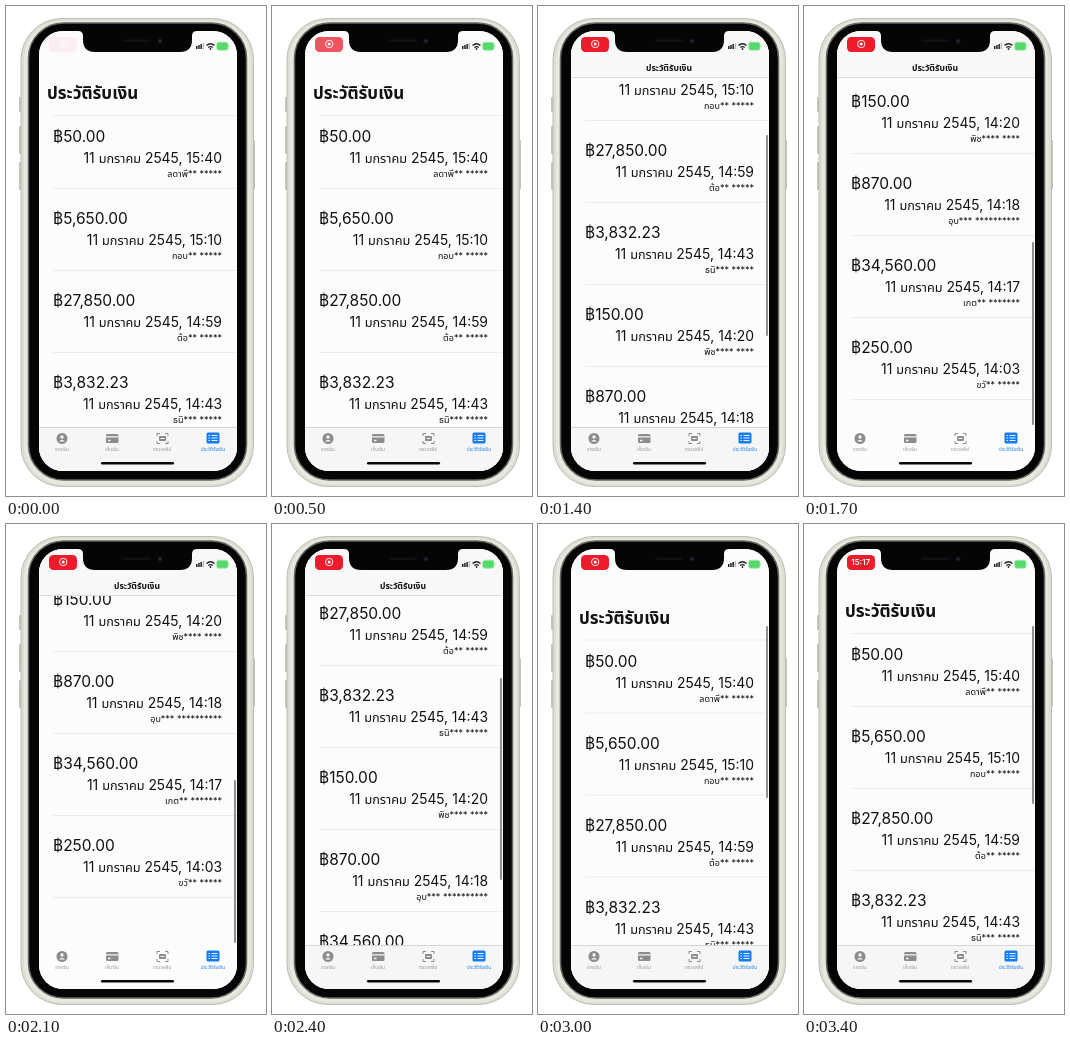
Animation, 260 px wide and 490 px high, one loop 3600 ms. Source, as an HTML page:

```html
<!DOCTYPE html>
<html lang="th">
<head>
<meta charset="utf-8">
<style>
html, body { margin: 0; width: 100%; height: 100%; overflow: hidden; background: #fff; }
#stage { position: relative; width: 260px; height: 490px; overflow: hidden;
  font-family: Inter, "Noto Sans Thai Looped", "Noto Sans Thai", "Noto Sans", sans-serif; color: #111; }
#stage div, #stage svg { position: absolute; }
svg { left: 0; top: 0; }
#screen { left: 33px; top: 25px; width: 197.5px; height: 439.5px; border-radius: 24px; background: #fcfcfd; overflow: hidden; }
#view { left: -33px; top: -25px; width: 260px; height: 490px; }
#list { left: 0; top: 0; width: 260px; height: 490px; }
.rule { left: 47px; width: 185px; height: 1px; background: #ededef; }
.row { left: 47px; width: 185px; height: 73px; border-bottom: 1px solid #ededef; }
.row div, .line { white-space: nowrap; }
.amount { left: 0; top: 12px; font-size: 15.5px; line-height: 20px; }
.date { right: 16px; top: 33px; font-size: 13.9px; line-height: 20px; }
.date span { font-size: 12.7px; }
.name { right: 16px; top: 51px; font-size: 9px; line-height: 16px; }
#bigClip { left: 33px; top: 72px; width: 199px; height: 349px; overflow: hidden; }
#big { left: 8px; top: 0; font-size: 17px; font-weight: 700; line-height: 30px; }
#nav { left: 33px; top: 25px; width: 199px; height: 47px; background: #fcfcfd; }
#navFill { inset: 0; background: #f8f8f9; border-bottom: 1px solid #dcdcde; }
#small { left: 33px; width: 196px; top: 53px; line-height: 18px; font-size: 8.6px; font-weight: 600; text-align: center; }
#tabs { left: 33px; top: 421px; width: 199px; height: 45px; background: #fcfcfd; }
#tabFill { inset: 0; background: #f6f6f7; border-top: 1px solid #d6d6d8; }
.tab { top: 439px; width: 50px; text-align: center; font-size: 4.8px; line-height: 9px; color: #999; }
.tab.on { color: #1b7df0; }
#bar { left: 228.2px; width: 1.8px; border-radius: 1px; background: #909092; }
#pill { left: 42.5px; top: 31px; width: 28.5px; height: 14.5px; border-radius: 4.5px; background: #ec1c2c; overflow: hidden; }
#clock { inset: 0; text-align: center; color: #fff; font-size: 8px; font-weight: 600; line-height: 14px; }
</style>
</head>
<body>
<div id="stage">
  <svg width="260" height="490">
    <g fill="#c3c5bc">
      <rect x="13" y="91" width="3" height="15" rx="1"/>
      <rect x="13" y="120" width="3" height="28" rx="1"/>
      <rect x="13" y="156" width="3" height="28" rx="1"/>
      <rect x="246.500" y="134" width="2.500" height="49" rx="1"/>
    </g>
    <rect x="15" y="12.500" width="232.500" height="468" rx="41" fill="#dcddd3" stroke="#bcbdb3"/>
    <rect x="18" y="14.500" width="226.500" height="464" rx="38.500" fill="#e7e8df"/>
    <rect x="22.500" y="17" width="218" height="457" rx="35" fill="#050505" stroke="#666760" stroke-width="1.500"/>
  </svg>
  <div id="screen"><div id="view">
    <div id="list"></div>
    <div id="nav"><div id="navFill"></div></div>
    <div id="bigClip"><div id="big" class="line">ประวัติรับเงิน</div></div>
    <div id="small" class="line">ประวัติรับเงิน</div>
    <div id="bar"></div>
    <div id="tabs"><div id="tabFill"></div></div>
    <div id="pill">
      <svg id="rec" width="29" height="14" fill="none" stroke="#fff">
        <circle cx="14.200" cy="7" r="3.700" stroke-width=".9"/><circle cx="14.200" cy="7" r="1.500" fill="#fff" stroke="none"/>
      </svg>
      <div id="clock">15:17</div>
    </div>
    <svg width="260" height="490">
      <path d="M72 25H191Q186 25 186 30V34Q186 46 174 46H89Q77 46 77 34V30Q77 25 72 25Z" fill="#050505"/>
      <g fill="#222">
        <rect x="190" y="40" width="1.500" height="3"/><rect x="192.200" y="39" width="1.500" height="4"/>
        <rect x="194.400" y="38" width="1.500" height="5"/><rect x="196.600" y="37" width="1.500" height="6" fill="#bbb"/>
      </g>
      <path d="M200.500 39.500Q204.500 36 208.500 39.500M202.300 41.500Q204.500 39.700 206.700 41.500"
        fill="none" stroke="#222" stroke-width="1.400"/>
      <circle cx="204.500" cy="43" r=".9" fill="#222"/>
      <rect x="210.700" y="36.200" width="11.300" height="8" rx="2" fill="#55d96a" stroke="#a5e9b0" stroke-width=".8"/>
      <rect x="222.500" y="39" width="1" height="2.600" fill="#a5e9b0"/>
      <g fill="#8c8c8c">
        <circle cx="56" cy="432.500" r="5.500"/>
        <rect x="100" y="428" width="12.500" height="9" rx="1.500"/>
        <rect x="153" y="430" width="7" height="5" rx="1"/>
      </g>
      <circle cx="56" cy="431" r="1.700" fill="#f5f5f5"/>
      <path d="M53 435.500Q56 432 59 435.500Z" fill="#f5f5f5"/>
      <path d="M100 430.800H112.500M102 434.500H104.500" stroke="#f5f5f5" stroke-width="1.300"/>
      <path d="M151 430V427.500H154M159 427.500H162V430M162 435V437.500H159M154 437.500H151V435" fill="none" stroke="#8c8c8c"/>
      <path d="M154.500 432.500H158.500" stroke="#f5f5f5"/>
      <rect x="200.500" y="426.500" width="13" height="11" rx="1.500" fill="#147cf4"/>
      <path d="M202.500 429.500H204M205.500 429.500H211.500M202.500 432H204M205.500 432H211.500M202.500 434.500H204M205.500 434.500H211.500" stroke="#fff" stroke-width=".9"/>
      <rect x="95" y="456" width="73" height="2.500" rx="1.250" fill="#080808"/>
    </svg>
    <div class="tab" style="left:31px">รายเงิน</div>
    <div class="tab" style="left:81px">เก็บเงิน</div>
    <div class="tab" style="left:131px">ตรวจสลิป</div>
    <div class="tab on" style="left:182px">ประวัติรับเงิน</div>
  </div></div>
  <svg width="260" height="490">
    <rect x="117" y="33.500" width="28" height="2.500" rx="1.250" fill="#111"/>
    <circle cx="154" cy="35" r="2.500" fill="#15171f"/><circle cx="154" cy="35" r="1" fill="#2b3044"/>
  </svg>
</div>
<script>
const $ = id => document.getElementById(id);
const LOOP = 3600, STEP = 100, TOP = 109, PITCH = 82, END = 344;
const rows = [
  ["50.00", "15:40", "ลดาพี** *****"],
  ["5,650.00", "15:10", "กอบ** *****"],
  ["27,850.00", "14:59", "ต้อ** *****"],
  ["3,832.23", "14:43", "ธนิ*** *****"],
  ["150.00", "14:20", "พิช**** ****"],
  ["870.00", "14:18", "อุบ*** **********"],
  ["34,560.00", "14:17", "เกต** *******"],
  ["250.00", "14:03", "ขวั** *****"]
];
$("list").innerHTML = `<div class="rule" style="top:${TOP}px"></div>` +
  rows.map(([sum, time, name], i) =>
    `<div class="row" style="top:${TOP + i * PITCH}px"><div class="amount">฿${sum}</div>` +
    `<div class="date">11 <span>มกราคม</span> 2545, ${time}</div><div class="name">${name}</div></div>`).join("");

// [ms, value]
const scroll = [[1100, 0], [1200, 14], [1300, 64], [1400, 150], [1500, 250], [1600, 325], [1700, 363],
  [1800, 382], [1900, 389], [2000, 388], [2100, 383], [2200, 356], [2300, 290], [2400, 205], [2500, 122],
  [2600, 57], [2700, 14], [2800, -10], [2900, -12], [3000, -6.5], [3100, -3], [3200, -1], [3300, 0]];
const fade = [[0, .06], [300, .45], [600, .9], [1000, 1]];
const clockIn = [[3000, 0], [3300, 1]];
const barIn = [[1100, 0], [1200, 1]];

const clamp = (v, lo = 0, hi = 1) => Math.min(hi, Math.max(lo, v));
function at(keys, t) {
  const i = keys.findIndex(k => k[0] > t);
  if (i < 0) return keys[keys.length - 1][1];
  if (!i) return keys[0][1];
  const [a, x] = keys[i - 1], [b, y] = keys[i];
  return x + (y - x) * (t - a) / (b - a);
}

// Scroll bar ends: the track grows as the title folds away, then the bar runs down it.
function barEnds(y) {
  const fold = clamp(y / 57), run = clamp((y - 57) / (END - 57));
  const over = Math.max(0, y - END);
  return [102 - 15 * fold + 130 * run + over, 280 + 8 * fold + 131 * run + Math.min(0, y)];
}

function draw(t) {
  const y = at(scroll, t), flat = clamp((y - 26) / 10);
  $("list").style.transform = $("big").style.transform = `translateY(${-y}px)`;
  $("big").style.opacity = 1 - flat;
  $("small").style.opacity = $("navFill").style.opacity = flat;
  $("tabFill").style.opacity = clamp((END - y) / 12);

  const [top, low] = barEnds(y);
  $("bar").style.top = top + "px";
  $("bar").style.height = low - top + "px";
  $("bar").style.opacity = at(barIn, t);

  const c = at(clockIn, t);
  $("pill").style.opacity = at(fade, t);
  $("clock").style.opacity = c;
  $("rec").style.opacity = 1 - c;
}

const begin = performance.now();
function frame() {
  const t = (performance.now() - begin) % LOOP;
  draw(Math.floor(t / STEP) * STEP);
  requestAnimationFrame(frame);
}
draw(0);
requestAnimationFrame(frame);
</script>
</body>
</html>
```
